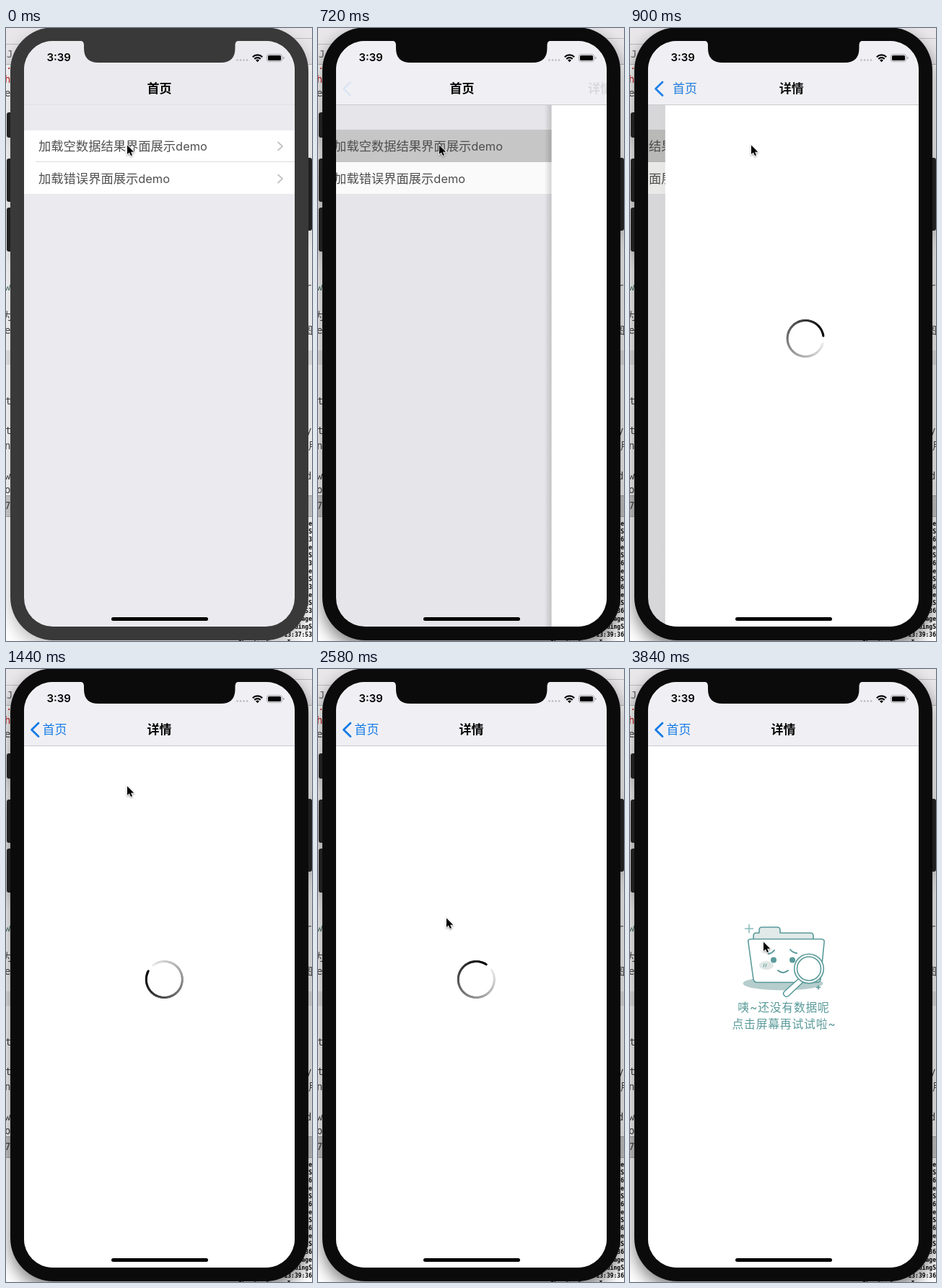
These frames come from a looping animation (424x850 px, 3.9 s). An HTML page:

```html
<!DOCTYPE html>
<html lang="zh">
<head>
<meta charset="utf-8">
<style>
  html, body { margin: 0; width: 100%; height: 100%; overflow: hidden; background: #fff; }
  svg { display: block; }
  text { font-family: Inter, "Noto Sans CJK SC", "Noto Sans CJK", sans-serif; white-space: pre; }
  .mono { font: 14px "DejaVu Sans Mono", "Noto Sans CJK SC", monospace; }
  .log { font: bold 8px "DejaVu Sans Mono", monospace; }
  .row { font-size: 17.3px; fill: #505050; }
  .row tspan { font-size: 16.4px; }
  .title { font-size: 17px; font-weight: 600; text-anchor: middle; }
  .back { font-size: 17px; fill: #157be6; text-anchor: middle; }
  .hint { font-size: 15.8px; letter-spacing: .8px; fill: #5a9a9a; text-anchor: middle; }
  .line { fill: none; stroke-linecap: round; stroke-linejoin: round; }
</style>
</head>
<body>
<svg width="424" height="850" viewBox="0 0 424 850">
  <defs>
    <clipPath id="screen"><rect x="25" y="18" width="375" height="812" rx="40"/></clipPath>
    <linearGradient id="fade"><stop stop-opacity="0"/><stop offset="1" stop-opacity=".2"/></linearGradient>
  </defs>

  <!-- windows behind the phone -->
  <rect width="424" height="850" fill="#fff"/>
  <rect width="424" height="50" fill="#e9e7ea"/>
  <path d="M380 14.5H424M0 22.5H40M0 50.5H424" stroke="#bbb"/>
  <rect y="447" width="424" height="20" fill="#ebebeb"/>
  <rect y="648" width="424" height="30" fill="#cfcfcf"/>
  <path d="M0 648.5H424M0 677.5H424" stroke="#aaa"/>
  <g id="editor"></g>
  <g id="console"></g>

  <!-- phone -->
  <g id="phone">
    <path d="M1 120q0-3 3-3h5v35h-5q-3 0-3-3zM1 184q0-3 3-3h5v60h-5q-3 0-3-3zM1 252q0-3 3-3h5v61h-5q-3 0-3-3zM416 180h5q3 0 3 3v95q0 3-3 3h-5z" fill="#202020"/>
    <rect id="body" x="6" y="-1" width="413" height="850" rx="60"/>
  </g>

  <g clip-path="url(#screen)">
    <rect x="25" y="18" width="375" height="812" fill="#ebeaee"/>
    <g id="list">
      <rect x="25" y="142" width="375" height="88" fill="#fff"/>
      <path d="M41 185.5H400" stroke="#dcdcdf"/>
      <rect id="pressed" x="25" y="141" width="375" height="45" fill="#cacacb"/>
      <text class="row" x="45" y="170">加载空数据结果界面展示<tspan>demo</tspan></text>
      <text class="row" x="45" y="215">加载错误界面展示<tspan>demo</tspan></text>
      <path class="line" d="M377 158.5l6 5.5-6 5.5M377 203.5l6 5.5-6 5.5" stroke="#c3c3c7" stroke-width="1.8"/>
    </g>
    <rect id="dim" x="25" y="106" width="375" height="724" fill="#1c1c00"/>
    <g id="page">
      <rect id="edge" x="15" y="106" width="10" height="724" fill="url(#fade)"/>
      <rect x="25" y="106" width="376" height="724" fill="#fff"/>
      <g id="spinner" class="line" stroke-width="3"></g>
      <g id="empty" class="line" stroke="#5a9a9a" stroke-width="1.6">
        <ellipse cx="212" cy="436" rx="55.5" ry="9.5" fill="#b5cdcc" stroke="none"/>
        <path d="M171 376v-6q0-4 4-4h4v-4q0-4 4-4h21q4 0 4 4v4h42q4 0 4 4v6z" fill="#e1eae9"/>
        <path d="M167 374.500h98q5 0 4 5l-5 51q-1 4-5 4h-83q-4 0-5-4l-7-51q-1-5 3-5z" fill="#fff"/>
        <ellipse cx="189" cy="411" rx="10" ry="6" fill="#dfe7e4" stroke="none"/>
        <path d="M185 413l1-4M188 413l1-4" stroke-width="1"/>
        <path d="M192 395q5-1 8-5M222 389q3 4 9 5M205 418q7 6 14 0" stroke-width="2"/>
        <g fill="#5a9a9a" stroke="none"><circle cx="199" cy="403.5" r="4"/><circle cx="225" cy="403.5" r="4"/></g>
        <path d="M233 430l-19 17q-3 3 0 6t6 0l19-18" fill="#fff"/>
        <circle cx="248" cy="415.5" r="20.3" fill="#fff"/>
        <circle cx="248" cy="415.5" r="16.5" fill="#fff"/>
        <path d="M159.500 360h11M165 354.500v11" stroke="#8cbcbc"/>
        <path d="M258.500 441.500h5M261 439v5"/>
        <g stroke="none">
          <text class="hint" x="213" y="475">咦~还没有数据呢</text>
          <text class="hint" x="213.500" y="498">点击屏幕再试试啦~</text>
        </g>
      </g>
    </g>

    <!-- navigation bar -->
    <rect id="bar" x="25" y="18" width="375" height="88"/>
    <path id="hairline" d="M25 106.500H400"/>
    <path id="chevron" class="line" d="M45 75l-9.500 9.300 9.500 9.300" stroke="#157be6" stroke-width="2.800"/>
    <text id="homeTitle" class="title" y="90">首页</text>
    <text id="homeBack" class="back" y="90">首页</text>
    <text id="detail" class="title" y="90">详情</text>

    <!-- status bar -->
    <text x="56.500" y="46" font-size="15" font-weight="600">3:39</text>
    <g fill="#bbb"><circle cx="320.500" cy="44.500" r="1.300"/><circle cx="325" cy="44.500" r="1.300"/><circle cx="329.500" cy="44.500" r="1.300"/><circle cx="334" cy="44.500" r="1.300"/></g>
    <path d="M341.800 40.200a9.500 9.500 0 0 1 13.400 0M344.300 42.900a6 6 0 0 1 8.400 0" fill="none" stroke="#000" stroke-width="2.200"/>
    <path d="M348.500 47.200l-2.400-2.400a3.400 3.400 0 0 1 4.800 0z"/>
    <rect x="361.500" y="36.500" width="21" height="10" rx="3" fill="none" stroke="#a0a0a2"/>
    <rect x="363" y="38" width="18" height="7" rx="1.600"/>
    <path d="M384 39.500q1.500.5 1.500 2t-1.500 2z" fill="#a0a0a2"/>
    <rect x="146" y="817" width="134" height="5" rx="2.500"/>
  </g>
  <path id="notch" d="M102 17.500q6 0 6 6v4.500q0 20 20 20H297.500q20 0 20-20v-4.500q0-6 6-6z"/>
  <path id="cursor" d="M0 0V12.600L2.900 10 5 14.600 7 13.700 5.100 9.200H9.200z" stroke="#fff" stroke-width="1.600" paint-order="stroke" style="filter:drop-shadow(0 1px 1px #0006)"/>
</svg>

<script>
const LOOP = 3900, FOCUS = 240, PRESS = 600, LOGGED = 660, LOADED = 3660;
const $ = id => document.getElementById(id);
const set = (id, attrs) => {
  for (const name in attrs) $(id).setAttribute(name, attrs[name]);
};
const clamp = v => Math.min(1, Math.max(0, v));
const ease = v => v * v * (3 - 2 * v);

// Glyphs of the editor that peek out at both sides: text, x, baseline, colour
$('editor').innerHTML = [
  ['J(', 1, 41, '#666'], ['.', 0, 57, '#c22'], ['h', -2, 76, '#c22'], ['e', -2, 95],
  ['w', -2, 364, '#577'], ['为', -5, 404], ['e', -2, 424], ['t', -1, 522], ['t', -1, 563],
  ['n', -2, 584], ['w', -2, 626], ['o', -2, 645], ['7', -2, 667],
  ['r', 415, 364], ['图', 411, 424], ['y', 415, 563], ['用', 419, 584], ['d', 415, 626]
].map(([s, x, y, fill = '#444']) => `<text class="mono" x="${x}" y="${y}" fill="${fill}">${s}</text>`).join('');

// Console lines repeat in threes and end at the right border
let loggedTime = '';
function writeConsole(time) {
  if (time === loggedTime) return;
  loggedTime = time;
  const words = ['LoadImage', 'LoadingS', time];
  let lines = '<text class="log" x="322" y="855">*LoadingScreenImage</text>';
  for (let i = 0; i < 15; i++)
    lines += `<text class="log" x="424" y="${690 + 11 * i}" text-anchor="end">${words[i % 3]}</text>`;
  $('console').innerHTML = lines;
}

// Ring made of short arcs, darkest at its clockwise end
const SEGMENTS = 60, RADIUS = 25;
const ringPoint = i => {
  const a = i / SEGMENTS * 2 * Math.PI;
  return `${(RADIUS * Math.sin(a)).toFixed(2)} ${(-RADIUS * Math.cos(a)).toFixed(2)}`;
};
for (let i = 4; i < SEGMENTS; i++) {
  const g = Math.round(255 * (1 - (i + 1) / SEGMENTS));
  $('spinner').innerHTML += `<path d="M${ringPoint(i)}A25 25 0 0 1 ${ringPoint(i + 1)}" stroke="rgb(${g},${g},${g})"/>`;
}

// Remaining distance of a critically damped spring, 1 to 0
function spring(t, start, rate) {
  const x = Math.max(0, t - start) * rate;
  return x > 12 ? 0 : (1 + x) * Math.exp(-x);
}

function cursorAt(t) {
  const down = ease(clamp((t - 1740) / 720)), last = ease(clamp((t - 3480) / 360));
  return [168 + 10 * down + 7 * last, 162.5 + 183 * down + 33 * last];
}

function draw(t) {
  const focused = t >= FOCUS, pushed = t >= 690, loaded = t >= LOADED;
  const shell = focused ? '#0b0b0b' : '#393939';
  set('body', { fill: shell });
  set('notch', { fill: shell });
  $('phone').style.filter = `drop-shadow(0 10px 11px rgba(0,0,0,${focused ? .5 : .25}))`;
  writeConsole(t < LOGGED ? '13:37:53' : '13:39:36');

  const rest = spring(t, 678.5, .0201), barRest = spring(t, 698, .0226);
  set('list', { transform: `translate(${-112.5 * (1 - rest)})` });
  set('page', { transform: `translate(${375 * rest})`, visibility: t < 678 ? 'hidden' : 'visible' });
  set('dim', { opacity: .1 * (1 - rest) });
  set('edge', { opacity: rest });
  set('pressed', { opacity: t < PRESS ? 0 : 1 });

  set('bar', { fill: pushed ? '#f0f0f4' : '#ebebef' });
  set('hairline', { stroke: pushed ? '#cbcbcf' : '#e1e1e5' });
  const labelX = 67.5 + 145 * barRest, black = clamp(1.5 * barRest);
  set('homeTitle', { x: labelX, opacity: black });
  set('homeBack', { x: labelX, opacity: 1 - black });
  set('chevron', { opacity: 1 - barRest });
  set('detail', { x: 212.5 + 196 * barRest, opacity: 1 - barRest });

  set('spinner', {
    transform: `translate(219.3 430.5) rotate(${.4 * t + 82})`,
    display: loaded ? 'none' : 'inline'
  });
  set('empty', { display: loaded ? 'inline' : 'none' });
  set('cursor', { transform: `translate(${cursorAt(t)})` });
}

const begin = performance.now();
function tick() {
  const t = (performance.now() - begin) % LOOP;
  draw(Math.floor(t / 60) * 60);
  requestAnimationFrame(tick);
}
tick();
</script>
</body>
</html>
```
